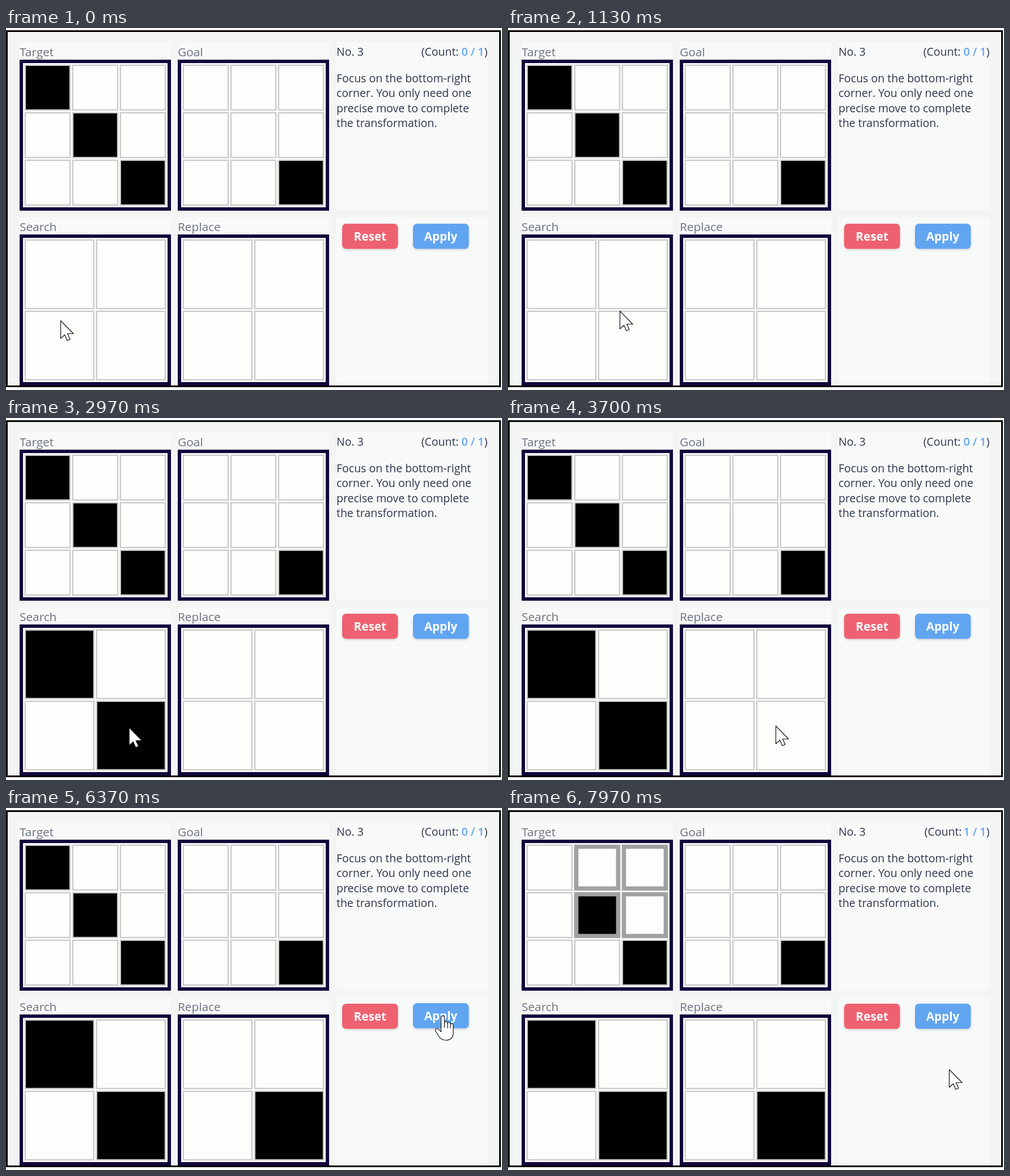
An HTML page for the animation above (8 s loop, 875 px wide and 640 px high).

```html
<!DOCTYPE html>
<html lang="en">
<head>
<meta charset="utf-8">
<title>Search and replace puzzle</title>
<style>
  html, body { margin: 0; width: 100%; height: 100%; overflow: hidden; background: #fdfefb; }
  svg { display: block; width: 875px; height: 640px; }
  text { font-family: "Open Sans", "Noto Sans", sans-serif; font-size: 19.5px; fill: #2d374b; }
  .label { font-size: 20.8px; fill: #6b7280; }
  .button text { font-size: 20.7px; font-weight: 700; fill: #fff; text-anchor: middle; }
  .button rect { filter: drop-shadow(0 2px 2px rgba(0, 0, 0, .13)); }
  .end { text-anchor: end; }
  #tally { font-weight: 600; fill: #60a5f2; }
</style>
</head>
<body>
<svg viewBox="0 0 875 640">
  <rect x="1.5" y="5.5" width="870" height="628" fill="#f3f4f4" stroke="#000" stroke-width="3"/>
  <g id="panels" fill="#f8f9f9"></g>
  <g id="boards"></g>

  <text x="583" y="49">No. 3</text>
  <text id="prefix" class="end" y="49">(Count:</text>
  <text id="tally" class="end" x="843.5" y="49"></text>
  <text class="end" x="849.5" y="49">)</text>
  <text y="96">
    <tspan x="583">Focus on the bottom-right</tspan>
    <tspan x="583" dy="26.4">corner. You only need one</tspan>
    <tspan x="583" dy="26.4">precise move to complete</tspan>
    <tspan x="583" dy="26.4">the transformation.</tspan>
  </text>

  <g class="button">
    <rect x="593" y="346" width="98.5" height="44.5" rx="7" fill="#ee6170"/>
    <text x="642.3" y="376">Reset</text>
  </g>
  <g class="button" id="apply">
    <rect x="718" y="346" width="98.5" height="44.5" rx="7" fill="#61a5f1"/>
    <text x="767" y="376">Apply</text>
  </g>

  <g id="cursor" fill="#fff" stroke="#111" stroke-width="1.2" stroke-linejoin="round">
    <path id="arrow" d="M0 0V31.5L7 25L11.5 35L16.5 32.8L12 23H22.5Z"/>
    <g id="hand">
      <path d="M-3 3Q-3 0 0 0Q3 0 3 3V12Q4 10 6 10Q8.500 10 8.500 13Q9.500 11.500 11 11.500Q13.500 11.500 13.500 14.500Q14.500 13.500 16 13.500Q18.500 13.500 18.500 17V30Q18.500 43 5 43Q-3 43 -7 36L-12.500 27Q-14 23.500 -11 22.500Q-8.500 22 -6 25L-3 28Z"/>
      <path d="M3 12V21M8.500 13V22M13.500 14.500V22" fill="none"/>
    </g>
  </g>
</svg>
<script>
const DURATION = 8000;
const byId = id => document.getElementById(id);

function addRect(parent, x, y, width, height, attrs = {}) {
  const rect = document.createElementNS('http://www.w3.org/2000/svg', 'rect');
  for (const [name, value] of Object.entries({ x, y, width, height, ...attrs })) {
    rect.setAttribute(name, value);
  }
  return parent.appendChild(rect);
}

// Builds a framed square board and returns its cells in reading order.
function makeBoard(label, x, y, count, pitch) {
  const boards = byId('boards');
  const text = document.createElementNS('http://www.w3.org/2000/svg', 'text');
  text.textContent = label;
  text.setAttribute('class', 'label');
  text.setAttribute('x', x);
  text.setAttribute('y', y - 6);
  boards.append(text);
  addRect(boards, x + 3, y + 3, 261, 261, { fill: '#fdfdfc', stroke: '#13043c', 'stroke-width': 6 });
  return Array.from({ length: count * count }, (_, i) => ({
    x: x + 8.7 + i % count * pitch,
    y: y + 8.7 + Math.floor(i / count) * pitch,
    size: pitch - 2.6,
    rect: addRect(boards, 0, 0, 0, 0)
  }));
}

function paint(cell, black, highlighted = false) {
  const line = highlighted ? 7.5 : 2.3;
  const inner = cell.size - line;
  const attrs = {
    x: cell.x + line / 2, y: cell.y + line / 2, width: inner, height: inner,
    fill: black ? '#000' : '#fdfdfc',
    stroke: highlighted ? '#a1a1a1' : '#cacaca',
    'stroke-width': line
  };
  for (const name in attrs) cell.rect.setAttribute(name, attrs[name]);
}

for (const x of [24, 303, 583]) {
  for (const y of [25, 335]) addRect(byId('panels'), x, y, 267, 297);
}
const target = makeBoard('Target', 24, 56, 3, 84);
const goal = makeBoard('Goal', 303, 56, 3, 84);
const search = makeBoard('Search', 24, 365, 2, 126);
const replace = makeBoard('Replace', 303, 365, 2, 126);
goal.forEach((cell, i) => paint(cell, i === 8));

// Pointer stops: time, x, y
const stops = [
  [0, 97, 518], [450, 97, 518], [1130, 198, 501], [1550, 118, 447], [1850, 118, 447],
  [2230, 181, 509], [2500, 212, 548], [2900, 212, 548], [3700, 473, 545],
  [4000, 489, 549], [4350, 489, 549], [5200, 767, 398], [5500, 771, 368],
  [6800, 771, 368], [7350, 779, 463], [DURATION, 779, 463]
];

function pointerAt(t) {
  const next = stops.findIndex(stop => stop[0] > t);
  const [t0, x0, y0] = stops[next - 1];
  const [t1, x1, y1] = stops[next];
  const p = (t - t0) / (t1 - t0);
  const eased = p * p * (3 - 2 * p);
  return [x0 + (x1 - x0) * eased, y0 + (y1 - y0) * eased];
}

function render(t) {
  const applied = t >= 6700;
  const replaced = t >= 7150;
  // Column of the 2x2 window being scanned
  const scan = applied ? (t >= 7550 ? 1 : 0) : -1;

  target.forEach((cell, i) => {
    const column = i % 3;
    const lit = scan >= 0 && i < 6 && column >= scan && column <= scan + 1;
    paint(cell, i % 4 === 0 && !(i === 0 && replaced), lit);
  });
  search.forEach((cell, i) => paint(cell, i === 0 && t >= 1700 || i === 3 && t >= 2650));
  replace.forEach((cell, i) => paint(cell, i === 3 && t >= 4150));

  byId('tally').textContent = applied ? '1 / 1' : '0 / 1';
  byId('prefix').setAttribute('x', applied ? 800.5 : 798.5);

  const [x, y] = pointerAt(t);
  const hover = x > 718 && x < 817 && y > 346 && y < 390;
  byId('cursor').setAttribute('transform', `translate(${x - 0.5} ${y - 0.5})`);
  byId('arrow').style.display = hover ? 'none' : '';
  byId('hand').style.display = hover ? '' : 'none';
  byId('apply').setAttribute('transform', `translate(0 ${hover ? -1 : 0})`);
}

const start = performance.now();
function tick() {
  render((performance.now() - start) % DURATION);
  requestAnimationFrame(tick);
}
tick();
</script>
</body>
</html>
```
